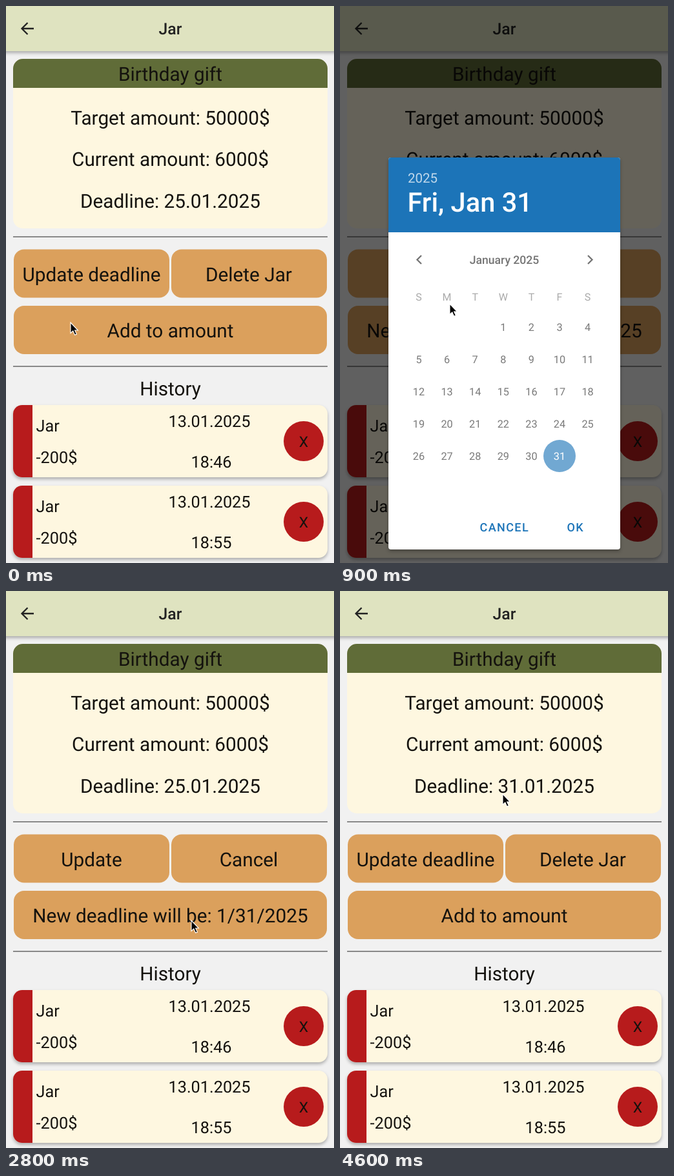
Write an HTML page that moves like this. It is 508 by 864 pixels and loops after 5.6 s.

```html
<!DOCTYPE html>
<html lang="en">
<head>
<meta charset="utf-8">
<title>Jar</title>
<style>
  html, body { margin: 0; width: 100%; height: 100%; overflow: hidden; background: #f1f1f1; }
  svg { display: block; width: 100vw; height: 100vh; }
  text { font-family: Roboto, sans-serif; font-size: 29.75px; fill: #14120e; text-rendering: geometricPrecision; }
  .mid { text-anchor: middle; }
  .title { font-size: 24.8px; font-weight: 500; fill: #222; }
  .small { font-size: 25.3px; }
  .x { font-size: 23px; }
  .button { fill: #dba05c; }
  .card { fill: #fef7e0; }
  .red { fill: #b71b1c; }
  .rule { stroke: #686868; stroke-width: 1.7; }
  .icon { fill: none; stroke: #222; stroke-width: 2.3; }
  .soft { filter: drop-shadow(0 3px 2.5px rgba(0, 0, 0, .28)); }
  .year { font-size: 20.5px; fill: #fff; fill-opacity: .72; }
  .date { font-size: 41.6px; font-weight: 500; fill: #fff; }
  .month { font-size: 17.6px; font-weight: 500; fill: #222; }
  .weekday { font-size: 16px; fill: #777; }
  .day { font-size: 16.3px; fill: #2a2a2a; }
  .picked { fill: #fff; }
  .action { font-size: 18px; font-weight: 500; letter-spacing: 1.4px; fill: #1c74b8; }
  .blue { fill: #1c74b8; }
</style>
</head>
<body>
<svg viewBox="0 0 508 864" preserveAspectRatio="none">
  <defs>
    <clipPath id="cardClip"><rect x="11" y="82" width="487" height="263" rx="15"/></clipPath>
    <clipPath id="rowClip"><rect x="11" y="619" width="487" height="112" rx="14"/></clipPath>
  </defs>
  <rect width="508" height="864" fill="#f1f1f1"/>
  <rect class="soft" x="-10" y="-10" width="528" height="80" fill="#dfe3c0"/>
  <path class="icon" d="M43 35H25M33.5 26L24.5 35L33.5 44"/>
  <text class="mid title" x="254.5" y="44">Jar</text>

  <g clip-path="url(#cardClip)">
    <rect class="card" x="11" y="82" width="487" height="263"/>
    <rect x="11" y="82" width="487" height="45" fill="#606c38"/>
  </g>
  <text class="mid" x="254.5" y="116">Birthday gift</text>
  <text class="mid" x="254.5" y="184">Target amount: 50000$</text>
  <text class="mid" x="254.5" y="248">Current amount: 6000$</text>
  <text class="mid" x="254.5" y="313" id="deadline"></text>
  <path class="rule" d="M11 358H498M11 559H498"/>

  <g id="leftButton">
    <rect class="button" x="12" y="377.5" width="241" height="75" rx="16"/>
    <text class="mid" x="132.5" y="426.5" id="leftLabel"></text>
  </g>
  <rect class="button" x="256" y="377.5" width="241" height="75" rx="16"/>
  <text class="mid" x="376" y="426.5" id="rightLabel"></text>
  <rect class="button" x="12" y="465" width="485" height="75" rx="16"/>
  <text class="mid" x="254.5" y="514" id="wideLabel"></text>
  <text class="mid" x="254.5" y="604">History</text>
  <g id="history"></g>

  <rect id="dim" width="508" height="864"/>
  <g id="dialog">
    <g class="soft">
      <rect x="75" y="235" width="359" height="608" rx="4" fill="#fff"/>
      <path class="blue" d="M75 351V239q0-4 4-4H430q4 0 4 4V351Z"/>
    </g>
    <text class="year" x="105" y="274">2025</text>
    <text class="date" x="104.5" y="319">Fri, Jan 31</text>
    <g id="calendar">
      <path class="icon" d="M126 387L119.5 393.5L126 400M384 387L390.5 393.5L384 400"/>
      <text class="mid month" x="254.5" y="399.5">January 2025</text>
      <circle class="blue" cx="340" cy="698" r="25"/>
    </g>
    <text class="action" x="216.5" y="815">CANCEL</text>
    <text class="action" x="351.5" y="815">OK</text>
  </g>

  <path id="cursor" d="M0 0V16.5L3.8 13L6.6 19.3L9.4 18.1L6.6 12H11.4Z" stroke="#fff" stroke-width="1.1"/>
</svg>
<script>
  const LOOP = 5600, STEP = 100;
  const OPEN = 700, CONFIRM = 1800, UPDATE = 4000, SAVED = 4300;
  const $ = id => document.getElementById(id);

  const historyRow = (time, dy) => `
    <g transform="translate(0 ${dy})">
      <g class="soft"><g clip-path="url(#rowClip)">
        <rect class="card" x="11" y="619" width="487" height="112"/>
        <rect class="red" x="11" y="619" width="30" height="112"/>
      </g></g>
      <text class="small" x="46.5" y="660">Jar</text>
      <text class="small" x="46.5" y="709">-200$</text>
      <text class="mid small" x="315" y="653">13.01.2025</text>
      <text class="mid small" x="318" y="716">${time}</text>
      <circle class="red" cx="461" cy="675" r="31"/>
      <text class="mid x" x="461" y="684">X</text>
    </g>`;
  $('history').innerHTML = historyRow('18:46', 0) + historyRow('18:55', 125);

  const cell = (kind, column, y, label) =>
    `<text class="mid ${kind}" x="${122 + 43.6 * column}" y="${y}">${label}</text>`;
  let cells = [...'SMTWTFS'].map((d, i) => cell('weekday', i, 456.5, d)).join('');
  for (let day = 1; day <= 31; day++) {
    const slot = day + 2;
    cells += cell(day === 31 ? 'day picked' : 'day', slot % 7, 504 + 50 * Math.floor(slot / 7), day);
  }
  $('calendar').insertAdjacentHTML('beforeend', cells);

  const ramp = (t, from, to) => Math.min(1, Math.max(0, (t - from) / (to - from)));
  const press = (t, down, up) => ramp(t, down - 200, down) - ramp(t, up, up + 100);

  // The pointer travels straight from stop to stop.
  const stops = [
    { at: 0, x: 100, y: 491 },
    { at: OPEN, x: 122, y: 428 },
    { at: 900, x: 170, y: 462 },
    { at: CONFIRM, x: 366, y: 803 },
    { at: 2000, x: 368, y: 714 },
    { at: 2800, x: 287, y: 511 },
    { at: UPDATE, x: 183, y: 425 },
    { at: 4600, x: 252, y: 315 }
  ];

  function pointer(t) {
    let { x, y } = stops[0];
    for (const stop of stops.slice(1)) {
      const from = stops[stops.indexOf(stop) - 1];
      const k = ramp(t, from.at, stop.at);
      x += (stop.x - from.x) * k;
      y += (stop.y - from.y) * k;
    }
    return `translate(${x} ${y})`;
  }

  function draw(t) {
    const editing = t > OPEN && t < SAVED;
    $('deadline').textContent = `Deadline: ${t < SAVED ? 25 : 31}.01.2025`;
    $('leftLabel').textContent = editing ? 'Update' : 'Update deadline';
    $('rightLabel').textContent = editing ? 'Cancel' : 'Delete Jar';
    $('wideLabel').textContent = editing ? 'New deadline will be: 1/31/2025' : 'Add to amount';

    const shown = ramp(t, OPEN, OPEN + 200);
    $('leftButton').style.opacity = 1 - .8 * (press(t, OPEN, OPEN) + press(t, UPDATE, UPDATE + 100));
    $('dim').style.opacity = .6 * (shown - ramp(t, CONFIRM, CONFIRM + 200));
    $('dialog').style.opacity = shown - ramp(t, CONFIRM, CONFIRM + 215);
    $('calendar').style.opacity = ramp(t, OPEN, OPEN + 320);
    $('cursor').setAttribute('transform', pointer(t));
  }

  const start = performance.now();
  function tick() {
    const elapsed = (performance.now() - start) % LOOP;
    draw(Math.floor(elapsed / STEP) * STEP);
    requestAnimationFrame(tick);
  }
  tick();
</script>
</body>
</html>
```
